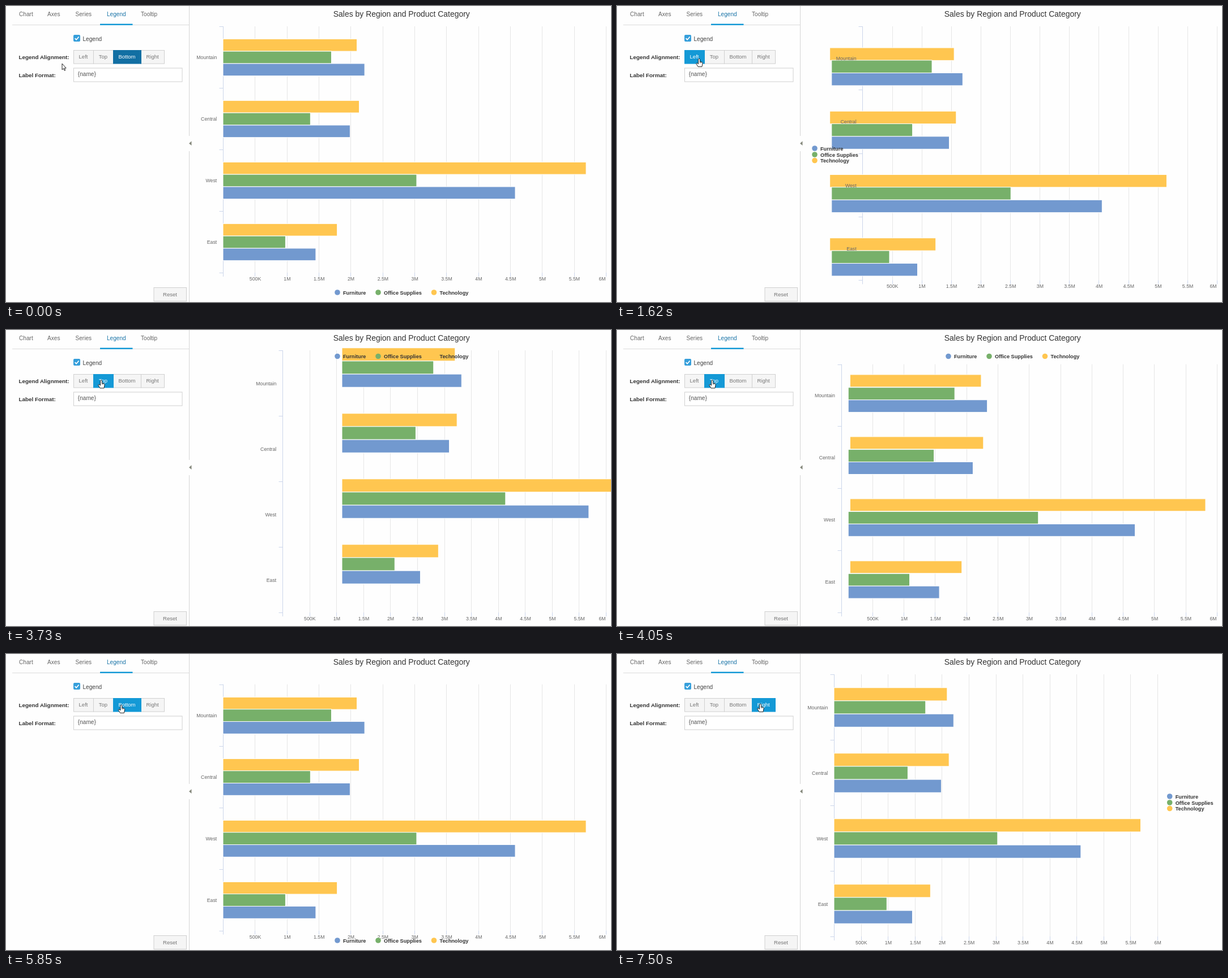
Animation, 1068 px wide and 524 px high, one loop 8 s. Source, as an HTML page:

```html
<!DOCTYPE html>
<html lang="en">
<head>
<meta charset="utf-8">
<title>Legend alignment</title>
<style>
  html, body { margin: 0; width: 100%; height: 100%; overflow: hidden; background: #fefefe; }
  svg { display: block; width: 1068px; height: 524px; font-family: "Liberation Sans", Arial, sans-serif; }
</style>
</head>
<body>
<svg id="stage" viewBox="0 0 1068 524">
  <defs><clipPath id="pane"><rect x="325" width="743" height="524"/></clipPath></defs>
  <g id="panel"></g>
  <g id="buttons"></g>
  <g id="chart"></g>
  <g id="cursor" stroke="#222" stroke-width="1" stroke-linejoin="round" fill="#fff">
    <path id="arrow" d="M0 0V10.8L2.5 8.6 4.2 12.4 5.8 11.7 4.1 8H7.2Z"/>
    <g id="hand">
      <path d="M-1.5 1.2Q0-.8 1.4 1.2V5.4L5 6.3Q6.2 6.8 6 8.8L5 14.4H-2L-5 9.4Q-5.2 7.6-3.6 8L-1.5 9.6Z"/>
      <path d="M1.4 5.4V8M3.3 6V8.3" stroke-width=".7"/>
    </g>
  </g>
</svg>
<script>
const LOOP = 8000;
const $ = id => document.getElementById(id);
const lerp = (a, b, p) => a + (b - a) * p;
const crisp = v => Math.round(v) + 0.5;

const line = (x1, y1, x2, y2, color) =>
  `<path d="M${x1} ${y1}L${x2} ${y2}" stroke="${color}" fill="none"/>`;
const box = (x, y, w, h, fill, stroke = 'none') =>
  `<rect x="${x}" y="${y}" width="${w}" height="${h}" fill="${fill}" stroke="${stroke}"/>`;
const text = (s, x, y, size, color, anchor = 'start', bold = false) =>
  `<text x="${x}" y="${y}" font-size="${size}" fill="${color}" text-anchor="${anchor}"` +
  `${bold ? ' font-weight="bold"' : ''}>${s}</text>`;

// Chart data, in millions
const REGIONS = ['Mountain', 'Central', 'West', 'East'];
const SERIES = [
  { name: 'Technology', color: '#ffc650', lag: 0.015, values: [2.1, 2.135, 5.69, 1.79] },
  { name: 'Office Supplies', color: '#77b06a', lag: 0, values: [1.7, 1.37, 3.035, 0.98] },
  { name: 'Furniture', color: '#7299cf', lag: 0, values: [2.22, 1.992, 4.58, 1.455] }
];
const LEGEND = [...SERIES].reverse();

// Plot area and legend place for each alignment
const ROW = y => [[585, y], [657, y], [755.5, y]];
const COLUMN = x => [[x, 252], [x, 263], [x, 273.5]];
const LAYOUTS = {
  Left: { x: 488, top: 36, right: 1059, bottom: 500, legend: COLUMN(349) },
  Top: { x: 383, top: 64, right: 1059, bottom: 500, legend: ROW(46.5) },
  Bottom: { x: 383, top: 36, right: 1059, bottom: 472, legend: ROW(507) },
  Right: { x: 383, top: 36, right: 954, bottom: 500, legend: COLUMN(975.7) }
};

// Redraws: each step is [time, progress] and is held until the next
const MOVES = [
  { from: 'Bottom', to: 'Left', steps: [[1390, 0], [1470, .08], [1550, .26], [1620, .48], [1710, .87], [1850, .97], [1930, 1]] },
  { from: 'Left', to: 'Top', steps: [[3730, 0], [3810, .12], [3890, .38], [3970, .66], [4050, .88], [4210, .98], [4280, 1]] },
  { from: 'Top', to: 'Bottom', steps: [[5540, 0], [5620, .05], [5780, .25], [5850, .37], [5930, .55], [6010, .71], [6090, .84], [6170, .94], [6250, .98], [6320, 1]] },
  { from: 'Bottom', to: 'Right', steps: [[6940, 0], [7020, .08], [7180, .35], [7260, .61], [7420, .95], [7500, 1]] }
];

// Button edges and the spans of time in which each is selected
const BUTTONS = [
  { name: 'Left', x: 119, end: 154, on: [[1230, 3650]] },
  { name: 'Top', x: 154, end: 189, on: [[3570, 5540]] },
  { name: 'Bottom', x: 189, end: 238, on: [[0, 1390], [5460, 6940]] },
  { name: 'Right', x: 238, end: 279, on: [[6790, LOOP]] }
];

const POINTER = [
  [0, 99, 102], [560, 99, 102], [840, 145, 93], [2500, 145, 93], [2950, 168, 88.5],
  [4830, 168, 88.5], [4910, 170, 89.5], [5310, 203.5, 90], [6200, 203.5, 90], [6480, 253, 88], [LOOP, 253, 88]
];

function panel() {
  const tabs = [['Chart', 23], ['Axes', 73], ['Series', 122.5], ['Legend', 178], ['Tooltip', 238]];
  let out = line(11, 33.5, 323, 33.5, '#dcdcdc') + box(166, 31.5, 57.5, 2.5, '#1499d6');
  for (const [name, x] of tabs)
    out += text(name, x, 17.5, 10.1, name === 'Legend' ? '#1b75a8' : '#666');
  out += line(323.5, 0, 323.5, 230, '#d4d4d4') + line(323.5, 257, 323.5, 524, '#d4d4d4');
  out += '<path d="M323 243.2L327.5 239.3V247.1Z" fill="#85887c"/>';
  out += '<rect x="119" y="51" width="12" height="12" rx="2" fill="#369fdb"/>' +
    '<path d="M121.6 57.2L124.1 59.7 128.6 54.5" fill="none" stroke="#fff" stroke-width="1.7"/>';
  out += text('Legend', 135.5, 61.8, 10.1, '#444');
  out += text('Legend Alignment:', 22.5, 94, 9.9, '#333', 'start', true);
  out += text('Label Format:', 22.5, 125.5, 9.9, '#333', 'start', true);
  out += box(119.5, 110, 191.5, 24, '#fff', '#d0d0d0') + text('{name}', 126.8, 124, 10.1, '#555');
  out += box(261, 498.5, 57.5, 24, '#f5f5f5', '#cfcfcf') + text('Reset', 289.5, 513.7, 9.6, '#777', 'middle');
  return out;
}

function buttons(t, x, y) {
  let over = '';
  const parts = BUTTONS.map(b => {
    const hover = y < 102 && x >= b.x && x < b.end;
    const on = b.on.some(([a, z]) => t >= a && t < z);
    const fill = on ? (hover ? '#1499d6' : '#126fa3') : hover ? '#e6e6e6' : '#f5f5f5';
    const face = box(b.x + 0.5, 78.5, b.end - b.x, 23.5, fill, on ? fill : '#d0d0d0') +
      text(b.name, (b.x + b.end) / 2, 93.2, 9.5, on ? '#fff' : '#777', 'middle');
    if (on) over += face;
    return on ? '' : face;
  });
  return parts.join('') + over;
}

function chartState(t) {
  const move = MOVES.filter(m => t >= m.steps[0][0]).pop();
  if (!move) return { from: LAYOUTS.Bottom, to: LAYOUTS.Bottom, p: 1 };
  const p = move.steps.filter(s => t >= s[0]).pop()[1];
  return { from: LAYOUTS[move.from], to: LAYOUTS[move.to], p };
}

function barBox(plot, region, row, value) {
  const slot = (plot.bottom - plot.top) / 4;
  return {
    x: plot.x, y: plot.top + slot * (region + 0.2 * (row + 1)),
    w: value * (plot.right - plot.x) / 6, h: slot * 0.2
  };
}

// Bars start shifted by the change in plot size, then slide home
function bars({ from, to, p }) {
  const dx = (to.right - to.x) - (from.right - from.x);
  const dy = (to.bottom - to.top) - (from.bottom - from.top);
  let out = '';
  SERIES.forEach((s, row) => s.values.forEach((v, region) => {
    const q = p < 1 ? Math.max(0, p - s.lag) : 1;
    const a = barBox(from, region, row, v), b = barBox(to, region, row, v);
    out += box(lerp(a.x + dx, b.x, q), lerp(a.y + dy, b.y, q) + 0.5,
      lerp(a.w, b.w, q), lerp(a.h, b.h, q), s.color, '#fff');
  }));
  return `<g clip-path="url(#pane)">${out}</g>`;
}

function chart(state) {
  const { from, to, p } = state;
  const [x, top, right, bottom] = ['x', 'top', 'right', 'bottom'].map(k => lerp(from[k], to[k], p));
  const slot = (bottom - top) / 4;
  let grid = '', labels = '';
  for (let i = 1; i <= 12; i++) {
    const gx = lerp(x, right, i / 12);
    grid += line(crisp(gx), top, crisp(gx), bottom, '#e6e6e6') +
      line(crisp(gx), bottom, crisp(gx), bottom + 7, '#ccd6eb');
    labels += text(i === 1 ? '500K' : i / 2 + 'M', Math.min(gx + 0.7, 1052.5), bottom + 14, 8.75, '#666', 'middle');
  }
  const ax = crisp(x);
  grid += line(ax, top, ax, bottom + 7, '#ccd6eb');
  for (let i = 0; i <= 4; i++) {
    const y = crisp(top + slot * i);
    grid += line(ax - 7, y, ax, y, '#ccd6eb');
    if (i < 4) labels += text(REGIONS[i], x - 10.7, top + slot * (i + 0.5) + 3.8, 8.75, '#666', 'end');
  }
  let legend = '';
  LEGEND.forEach((s, i) => {
    const [lx, ly] = to.legend[i];
    legend += `<circle cx="${lx}" cy="${ly}" r="4.8" fill="${s.color}"/>` +
      text(s.name, lx + 10, ly + 3.6, 9.2, '#333', 'start', true);
  });
  return grid + bars(state) + labels + legend +
    text('Sales by Region and Product Category', 698.3, 19, 13.95, '#333', 'middle');
}

function pointer(t) {
  const i = Math.max(1, POINTER.findIndex(k => k[0] > t));
  const a = POINTER[i - 1], b = POINTER[i];
  const p = (t - a[0]) / (b[0] - a[0]);
  return [lerp(a[1], b[1], p), lerp(a[2], b[2], p)];
}

function draw(t) {
  const [x, y] = pointer(t);
  const onButton = x >= 119;
  $('buttons').innerHTML = buttons(t, x, y);
  $('chart').innerHTML = chart(chartState(t));
  $('cursor').setAttribute('transform', `translate(${x} ${y})`);
  $('arrow').style.display = onButton ? 'none' : '';
  $('hand').style.display = onButton ? '' : 'none';
}

$('panel').innerHTML = panel();
const begin = performance.now();
function tick() {
  draw((performance.now() - begin) % LOOP);
  requestAnimationFrame(tick);
}
tick();
</script>
</body>
</html>
```
